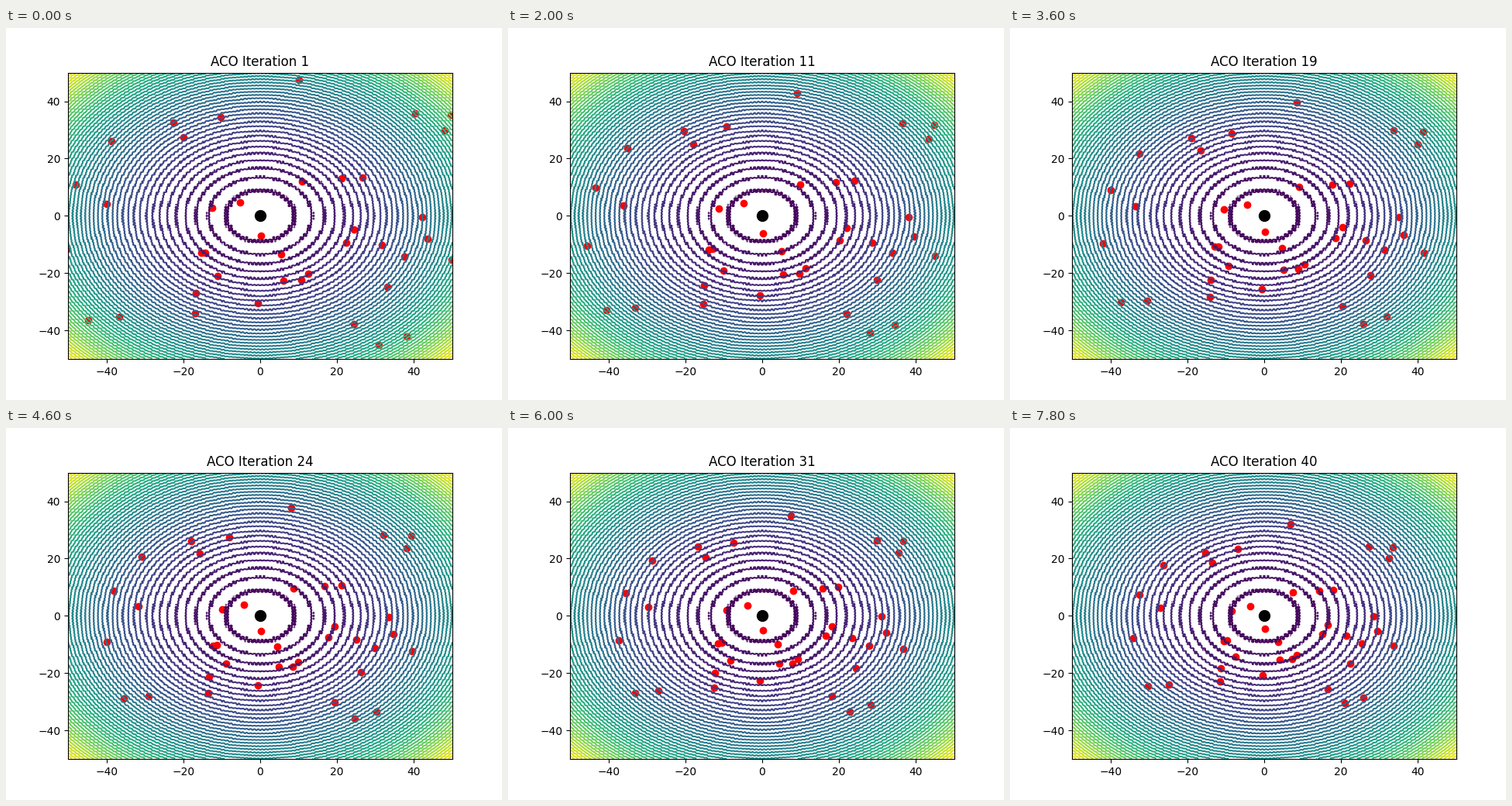
A matplotlib script for the animation above (8000 ms loop, 640 by 480 pixels).

```python
import numpy as np
import matplotlib.pyplot as plt
from matplotlib.animation import FuncAnimation

STEPS = 40
DECAY = 0.99      # pull towards the optimum per step
LIMIT = 50

# Where the ants set out.
START = np.array([
    (10.1, 47.5), (40.4, 35.7), (49.6, 35.2), (47.9, 29.8), (-22.6, 32.7),
    (-19.9, 27.5), (-10.2, 34.5), (-38.8, 26.0), (-47.9, 10.9), (-40.0, 4.1),
    (-50.3, -11.4), (-12.5, 2.7), (-5.3, 4.8), (0.2, -6.8), (10.9, 12.0),
    (21.2, 13.1), (26.6, 13.5), (24.4, -4.8), (22.3, -9.4), (31.6, -10.3),
    (42.1, -0.4), (43.6, -7.9), (37.5, -14.2), (49.7, -15.4), (33.1, -24.8),
    (5.5, -13.5), (6.1, -22.5), (10.7, -22.4), (12.5, -20.2), (-0.7, -30.6),
    (-15.4, -13.0), (-14.3, -12.8), (-11.1, -21.0), (-16.7, -26.9),
    (-17.0, -34.0), (-36.6, -35.4), (-44.8, -36.3), (24.4, -37.9),
    (30.9, -45.2), (38.2, -42.1),
])


def rastrigin(x, y):
    return (20 + x**2 - 10 * np.cos(2 * np.pi * x)
            + y**2 - 10 * np.cos(2 * np.pi * y))


fig, ax = plt.subplots(figsize=(6.4, 4.8), dpi=100)
axis = np.linspace(-LIMIT, LIMIT, 400)
X, Y = np.meshgrid(axis, axis)
ax.contour(X, Y, rastrigin(X, Y), levels=50, cmap="viridis")
swarm = ax.scatter(*START.T, color="red")
ax.scatter(0, 0, color="black", s=100)
ax.set_xlim(-LIMIT, LIMIT)
ax.set_ylim(-LIMIT, LIMIT)
title = ax.set_title("ACO Iteration 1")


def update(step):
    swarm.set_offsets(START * DECAY**step)
    title.set_text(f"ACO Iteration {step + 1}")
    return swarm, title


anim = FuncAnimation(fig, update, frames=STEPS, init_func=lambda: update(0),
                     interval=200, repeat=True, repeat_delay=0)
plt.show()
```
